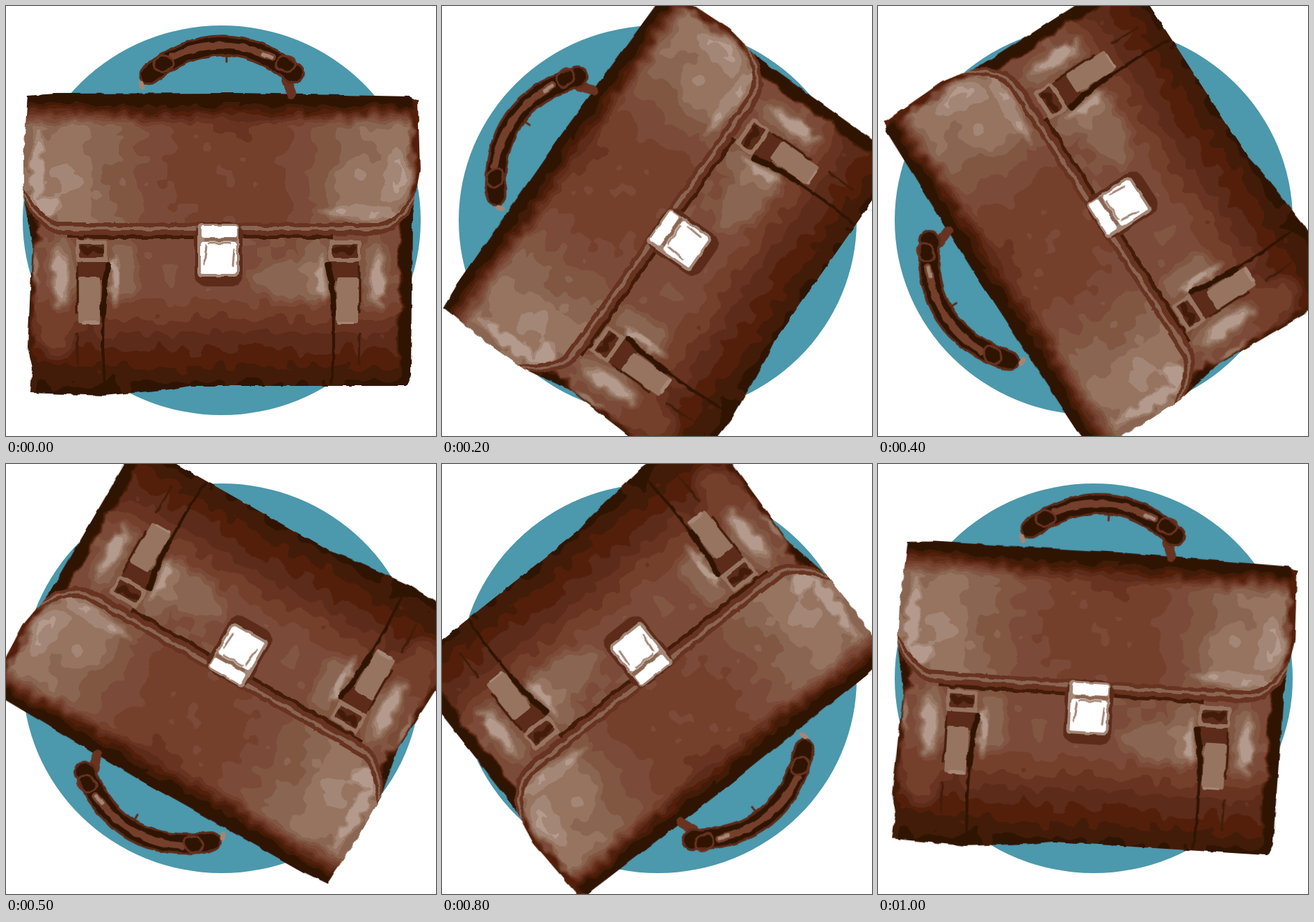
Animation, 618 px wide and 618 px high, one loop 1100 ms. Source, as an HTML page with a canvas:

```html
<!DOCTYPE html>
<html lang="en">
<head>
<meta charset="utf-8">
<title>Spinning briefcase</title>
<style>
html, body { margin: 0; width: 100%; height: 100%; overflow: hidden; background: #fff; }
canvas { display: block; }
</style>
</head>
<body>
<canvas id="stage" width="618" height="618"></canvas>
<script>
const SIZE = 618, STEP = 100;
const ANGLES = [0, -27.5, -55, -95.5, -123, -150.4, -178, -198, -218.6, -287, -356.4];
// Leather tones, dark to light
const TONES = ['#301402', '#421c08', '#541f0a', '#5c2b1a', '#683320', '#74402c',
  '#7c4a38', '#825742', '#8a6652', '#967460', '#a48676', '#b49a8c'];
const RGB = TONES.map(t => [1, 3, 5].map(i => parseInt(t.slice(i, i + 2), 16)));
const STRAPS = [{ x: 122, side: 1 }, { x: 488, side: -1 }];

const stage = document.getElementById('stage').getContext('2d');
const bag = Object.assign(document.createElement('canvas'), { width: SIZE, height: SIZE });
const c = bag.getContext('2d', { willReadFrequently: true });
c.lineCap = c.lineJoin = 'round';

const clamp = (v, lo, hi) => Math.max(lo, Math.min(hi, v));
const mix = (a, b, t) => a + (b - a) * t;
function smooth(from, to, v) {
  const t = clamp((v - from) / (to - from), 0, 1);
  return t * t * (3 - 2 * t);
}

function hash(x, y) {
  const s = Math.sin(x * 127.1 + y * 311.7) * 43758.5453;
  return s - Math.floor(s);
}

// Smooth seeded noise from -1 to 1
function noise(x, y) {
  const ix = Math.floor(x), iy = Math.floor(y);
  const u = smooth(0, 1, x - ix), v = smooth(0, 1, y - iy);
  return 2 * mix(mix(hash(ix, iy), hash(ix + 1, iy), u),
    mix(hash(ix, iy + 1), hash(ix + 1, iy + 1), u), v) - 1;
}
const wobble = (x, y, amount, scale) => [
  x + amount * noise(x / scale, y / scale),
  y + amount * noise(x / scale + 90, y / scale + 40)];

// Calls paint(x, y, index of the pixel's first byte) for every pixel
function eachPixel(paint) {
  for (let y = 0, i = 0; y < SIZE; y++)
    for (let x = 0; x < SIZE; x++, i += 4) paint(x, y, i);
}

// Pulls the tone of point p towards a level inside a soft ellipse
function glow(p, x, y, rx, ry, level) {
  const d = Math.hypot((p.x - x) / rx, (p.y - y) / ry);
  p.v = mix(p.v, level, 1 - smooth(.5, 1.4, d));
}

function flapTone(x, y) {
  const p = { x, y, v: 5.2 + 3.4 * smooth(50, 230, Math.abs(x - 318)) };
  glow(p, 325, 182, 30, 18, 4.3);
  glow(p, 85, 255, 36, 46, 9.4);
  glow(p, 44, 235, 9, 52, 11.4);
  glow(p, 62, 288, 17, 11, 11.4);
  glow(p, 515, 265, 50, 40, 9.4);
  glow(p, 508, 297, 55, 9, 10.5);
  glow(p, 560, 245, 17, 36, 10.6);
  return mix(p.v * smooth(136, 178, y), 2, smooth(578, 588, x));
}

function bodyTone(x, y) {
  const p = { x, y, v: 6.3 - 6 * clamp((y - 405) / 140, 0, 1) };
  glow(p, 72, 450, 26, 50, 5);
  glow(p, 412, 393, 58, 30, 8.3);
  for (const s of STRAPS) {
    glow(p, s.x + 44 * s.side, 380, 22, 42, 8.5);
    glow(p, s.x + 34 * s.side, 393, 7, 30, 10.8);
    glow(p, s.x - 42 * s.side, 385, 20, 50, 8.3);
    glow(p, s.x - 46 * s.side, 390, 11, 36, 11.2);
  }
  p.v = mix(p.v, 1, smooth(44, 36, x));
  glow(p, 41, 375, 5, 20, 9);
  glow(p, 38, 320, 11, 24, 0);
  return mix(p.v, 0, smooth(562, 569, x));
}

// Flap, seam and body by the distance below the round-cornered flap edge
function leatherTone(x, y) {
  const corner = Math.max(0, Math.abs(x - 307) - 225) / 55;
  const below = y + noise(x / 12, y / 12) - (326 - 45 * corner ** 2);
  const [wx, wy] = wobble(x, y, 5, 12);
  const blotch = .5 * noise(x / 17 + 30, y / 17 + 70);
  if (below < -15) return flapTone(wx, wy) + blotch;
  if (below < -9) return 4;
  if (below < -4) return 8;
  if (below < 3) return 4;
  if (below < 8 && x > 88 && x < 470) return 1;
  return bodyTone(wx, wy) + blotch;
}

function paintLeather() {
  const image = c.createImageData(SIZE, SIZE);
  eachPixel((x, y, i) => {
    const tone = clamp(Math.floor(leatherTone(x, y) + .5), 0, 11);
    image.data.set([...RGB[tone], 255], i);
  });
  c.putImageData(image, 0, 0);
  c.globalCompositeOperation = 'destination-in';
  c.fill(new Path2D('M31 129L70 126 335 125 580 130 592 136 595 235 584 300 582 530 575 546' +
    ' 265 546 235 551 140 560 35 556 38 520 31 490 38 345 25 275 25 215Z'));
  c.globalCompositeOperation = 'source-over';
}

function box(color, x, y, w, h, r = 3) {
  c.fillStyle = color;
  c.beginPath();
  c.roundRect(x, y, w, h, r);
  c.fill();
}

function line(color, width, d) {
  c.strokeStyle = color;
  c.lineWidth = width;
  c.stroke(new Path2D(d));
}

function drawStrap({ x, side }) {
  c.save();
  c.translate(x, 0);
  c.scale(side, 1);
  box(TONES[3], -20, 366, 42, 28);
  box(TONES[9], -18, 390, 31, 66);
  box(TONES[10], -12, 453, 24, 5);
  line(TONES[1], 3, 'M-20 375V440M-20 470L-19 515');
  line(TONES[0], 4, 'M18 400L17 490 20 543');
  line(TONES[0], 8, 'M25 372L20 395 17 443');
  box(TONES[9], -22, 336, 46, 32);
  box(TONES[3], -17, 342, 36, 20);
  line(TONES[1], 9, 'M-11 348L-6 354 4 348 14 352');
  c.restore();
}

function drawLock() {
  box(TONES[3], 271, 310, 69, 93, 18);
  box(TONES[10], 275, 313, 60, 76, 6);
  box('#fff', 280, 316, 53, 17, 4);
  box(TONES[8], 284, 334, 49, 4);
  box('#fff', 279, 339, 52, 46, 4);
  line(TONES[10], 3, 'M288 344L285 371M292 341H322M327 350L325 374');
}

function drawHandle() {
  const arc = 'M206 98Q312 16 413 97';
  line(TONES[4], 14, 'M404 108L411 126');
  line(TONES[3], 31, arc);
  line(TONES[0], 24, arc);
  line(TONES[5], 10, 'M240 72Q312 40 382 74');
  for (const x of [226, 402]) {
    c.beginPath();
    c.ellipse(x, 83, 14, 11, 0, 0, 7);
    line(TONES[4], 3, 'M0 0');
    c.stroke();
  }
  line(TONES[3], 3, 'M316 73V80');
  line(TONES[10], 5, 'M370 69L381 74');
  line(TONES[10], 7, 'M194 110L196 116');
}

// Gives all contours a slightly torn edge
function roughen(amount, scale) {
  const source = new Uint32Array(c.getImageData(0, 0, SIZE, SIZE).data.buffer);
  const image = c.createImageData(SIZE, SIZE), out = new Uint32Array(image.data.buffer);
  eachPixel((x, y, i) => {
    const [sx, sy] = wobble(x, y, amount, scale).map(v => clamp(Math.round(v), 0, SIZE - 1));
    out[i / 4] = source[sy * SIZE + sx];
  });
  c.putImageData(image, 0, 0);
}

function drawBag() {
  paintLeather();
  STRAPS.forEach(drawStrap);
  drawLock();
  drawHandle();
  roughen(1.4, 9);
}

function frame(time) {
  stage.fillStyle = '#fff';
  stage.fillRect(0, 0, SIZE, SIZE);
  stage.fillStyle = '#4c98ac';
  stage.beginPath();
  stage.ellipse(310, 308, 286, 280, 0, 0, 7);
  stage.fill();
  stage.save();
  stage.translate(SIZE / 2, SIZE / 2);
  stage.rotate(ANGLES[Math.floor(time / STEP) % ANGLES.length] * Math.PI / 180);
  stage.drawImage(bag, -SIZE / 2, -SIZE / 2);
  stage.restore();
}

drawBag();
let start;
function tick(now) {
  start ??= now;
  frame(now - start);
  requestAnimationFrame(tick);
}
frame(0);
requestAnimationFrame(tick);
</script>
</body>
</html>
```
